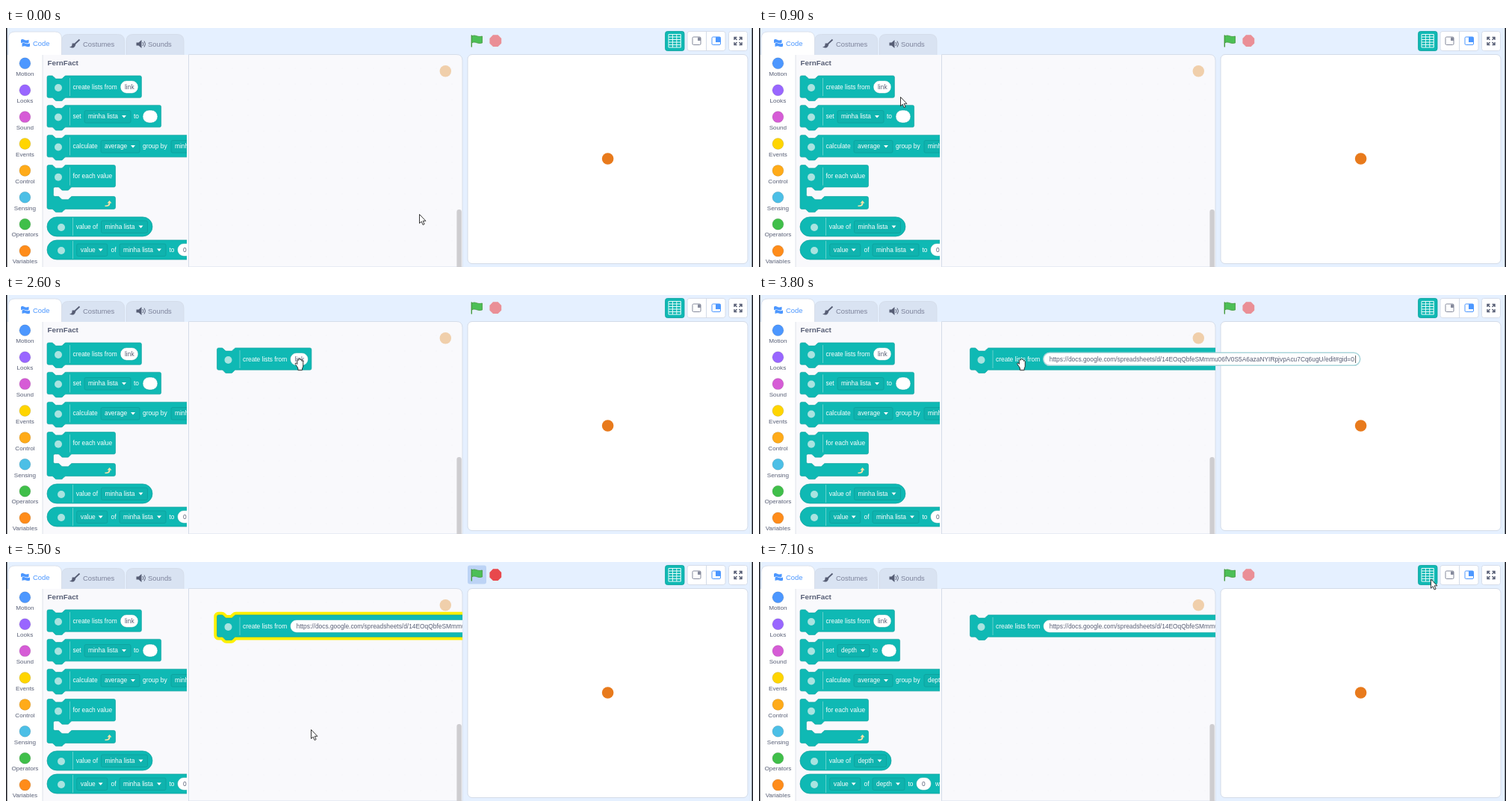
Animation, 1000 px wide and 320 px high, one loop 7.2 s. Source, as an HTML page:

```html
<!DOCTYPE html>
<html lang="en">
<head>
<meta charset="utf-8">
<title>Block editor</title>
<style>
html, body { margin: 0; width: 100%; height: 100%; overflow: hidden; background: #e5f0ff; }
svg { display: block; font-family: "Liberation Sans", Arial, sans-serif; }
</style>
</head>
<body>
<svg id="stage" width="1000" height="320" viewBox="0 0 1000 320"></svg>
<script>
const LOOP = 7200, STEP = 100;
const TEAL = '#0fb9b4', TEAL_DARK = '#0ea09c', GRAY = '#575e75', LINE = '#d3dbe8';
const URL_TEXT = 'https://docs.google.com/spreadsheets/d/14EOqQbfeSMmmu06fV0S5A6azaNYIRpjvpAcu7Cq6ugU/edit#gid=0';

const attrs = o => Object.entries(o).map(([k, v]) => `${k}="${v}"`).join(' ');
const rect = (x, y, width, height, rx, fill, more = {}) =>
  `<rect ${attrs({ x, y, width, height, rx, fill, ...more })}/>`;
const circle = (cx, cy, r, fill, more = {}) => `<circle ${attrs({ cx, cy, r, fill, ...more })}/>`;
const path = (d, fill, more = {}) => `<path ${attrs({ d, fill, ...more })}/>`;
const text = (x, y, str, fill = '#fff', size = 8.4, more = {}) =>
  `<text ${attrs({ x, y, fill, 'font-size': size, ...more })}>${str}</text>`;
const group = (id, body, more = {}) => `<g ${attrs({ id, ...more })}>${body}</g>`;

// Block outlines, in units of UNIT pixels
const UNIT = 0.525;
const NOTCH = 'c2 0 3 1 4 2l4 4c1 1 2 2 4 2h12c2 0 3-1 4-2l4-4c1-1 2-2 4-2';
const BUMP = 'c-2 0-3 1-4 2l-4 4c-1 1-2 2-4 2h-12c-2 0-3-1-4-2l-4-4c-1-1-2-2-4-2';
function outline(width, mouth) {
  const w = width / UNIT;
  const corner = 'a4 4 0 0 1-4 4';
  const inner = mouth
    ? `${corner}H64${BUMP}h-8a4 4 0 0 0-4 4v16a4 4 0 0 0 4 4h8${NOTCH}H${w - 4}a4 4 0 0 1 4 4v24` : '';
  return `M0 4a4 4 0 0 1 4-4h8${NOTCH}H${w - 4}a4 4 0 0 1 4 4v48${inner}${corner}H48${BUMP}H4a4 4 0 0 1-4-4z`;
}
const shape = (x, y, d, fill, more) =>
  path(d, fill, { transform: `translate(${x} ${y}) scale(${UNIT})`, ...more });
const badge = (x, y) => circle(x, y + 1, 5, '#a9e3e0') +
  path(`M${x + 15.5} ${y - 12}v24`, 'none', { stroke: '#6fd3cf', 'stroke-width': 0.9 });
const block = (y, width, mouth) =>
  shape(55, y - 15.1, outline(width, mouth), TEAL, { stroke: TEAL_DARK, 'stroke-width': 1.2 }) + badge(70, y);
const pill = (y, width) =>
  rect(55, y - 13, width, 26, 13, TEAL, { stroke: TEAL_DARK, 'stroke-width': 0.7 }) + badge(74, y);
const label = (x, y, str) => text(x, y + 2.6, str);
const menu = (x, y, width, str) =>
  rect(x, y - 8, width, 16.5, 2, '#0fb3ae', { stroke: TEAL_DARK, 'stroke-width': 0.8 }) +
  label(x + 5, y, str) + path(`M${x + width - 12} ${y - 1.5}h6l-3 3.4z`, '#fff');
const slot = (x, y, width, str = '', inset = 6) =>
  rect(x, y - 8.5, width, 17, 8.5, '#fff', { stroke: TEAL_DARK, 'stroke-width': 0.5 }) +
  text(x + inset, y + 2.6, str, GRAY);

const linkBlock = (width, slotWidth, str, inset) =>
  block(79, width) + label(89.5, 79, 'create lists from') + slot(153, 79, slotWidth, str, inset);

function palette(id, name, nameWidth) {
  const menuWidth = nameWidth + 22;
  return group(id,
    block(118.5, 112.6 + nameWidth) + label(89.5, 118.5, 'set') + menu(105, 118.5, menuWidth, name) +
    label(131 + nameWidth, 118.5, 'to') + slot(143 + nameWidth, 118.5, 20) +
    block(158.5, 300) + label(89.5, 158.5, 'calculate') + menu(127, 158.5, 52, 'average') +
    label(183, 158.5, 'group by') + menu(221, 158.5, menuWidth, name) +
    pill(266, 101 + nameWidth) + label(93.7, 266, 'value of') + menu(127.5, 266, menuWidth, name) +
    pill(297, 300) + menu(94.7, 297, 41, 'value') + label(140.6, 297, 'of') +
    menu(152, 297, menuWidth, name) + label(178.5 + nameWidth, 297, 'to') +
    slot(189.5 + nameWidth, 297, 20, '0', 7.5) + label(215 + nameWidth, 297, 'w'));
}

function header() {
  const tab = (x, y, w, fill) =>
    path(`M${x} 37V${y + 9}q0-9 9-9h${w - 18}q9 0 9 9V37z`, fill, { stroke: LINE, 'stroke-width': 0.8 });
  const button = (x, w) => rect(x, 4.5, w, 26, 3, '#fff', { stroke: LINE, 'stroke-width': 0.9 });
  const muted = '#7c829a';
  const wave = (x, y) =>
    path(`M${x} ${y}c2-1.5 3.5-.2 5.5.4s3.5.2 5-.5v4c-2 1.3-3.5.5-5.5 0s-3.5-.3-5 .4z`, '#4c97ff');
  let cells = '';
  for (let row = 0; row < 5; row++)
    for (let col = 0; col < 3; col++)
      cells += rect(887.5 + col * 5.4, 9 + row * 3.5, 4.4, 2.5, 0, TEAL);
  return tab(74.5, 8.5, 84, '#d9e3f2') + tab(161, 8.5, 77, '#d9e3f2') + tab(3, 5, 71.5, '#fff') +
    wave(20, 15.8) + wave(21.5, 20.6) + text(36, 23.5, 'Code', '#4c97ff', 9.4) +
    path('M98.5 15.5l-6.5 6M92.5 21.5q-1 5-5 4 2-1 2-4z', GRAY, { stroke: GRAY, 'stroke-width': 1.8 }) +
    text(103, 24.8, 'Costumes', muted, 9.4) +
    path('M174.5 19.5h3l4-3.5v11l-4-3.5h-3z', GRAY) +
    path('M183 19q2 2.5 0 5M185 17.5q3 4 0 8', 'none', { stroke: GRAY, 'stroke-width': 1 }) +
    text(190, 24.8, 'Sounds', muted, 9.4) +
    rect(618, 4.5, 25, 25, 3, '#bcd3f5', { id: 'flagLit' }) +
    path('M623.5 11c5-3 7 2 14 0v9c-7 2-9-3-14 0z', '#4cbf56', { stroke: '#45993d', 'stroke-width': 0.8 }) +
    path('M623.3 10v15', 'none', { stroke: '#45993d', 'stroke-width': 1.4, 'stroke-linecap': 'round' }) +
    path('M652 9.3h6.6l4.6 4.6v6.6l-4.6 4.6H652l-4.6-4.6v-6.6z', '#ea8f96', { id: 'stop' }) +
    rect(882.5, 4.5, 25.5, 26, 3, TEAL, { stroke: TEAL_DARK, 'stroke-width': 0.8 }) +
    rect(886.5, 8, 17.3, 18.5, 1, '#e9fbfa') + cells +
    button(912, 51) + button(967.5, 25) + path('M937.5 4.5v26', 'none', { stroke: LINE }) +
    rect(919, 12, 11, 10.5, 1.5, '#fff', { stroke: '#858a9c', 'stroke-width': 1 }) +
    rect(926, 12.5, 4, 4.5, 0.5, '#858a9c') +
    rect(945, 12, 11.5, 10.5, 1.5, '#fff', { stroke: '#4c97ff', 'stroke-width': 1 }) +
    rect(950, 12, 6.5, 7, 0.5, '#4c97ff') +
    path('M975 16v-3.5h3.5M981.5 12.5h3.5v3.5M985 19v3.5h-3.5M978.5 22.5H975V19M975.5 13l3 3M984.5 13l-3 3M984.5 22l-3-3M975.5 22l3-3',
      'none', { stroke: GRAY, 'stroke-width': 1.4 });
}

function categories() {
  const items = [['Motion', '#4c97ff'], ['Looks', '#9966ff'], ['Sound', '#d65cd6'], ['Events', '#ffd500'],
    ['Control', '#ffab19'], ['Sensing', '#4cbfe6'], ['Operators', '#40bf4a'], ['Variables', '#ff8c1a']];
  return rect(1, 36, 48, 284, 0, '#fff') + items.map(([name, fill], i) => {
    const y = 47.3 + i * 35.9;
    return circle(25.4, y, 7.5, fill, { stroke: '#0002', 'stroke-width': 0.8 }) +
      text(25.4, y + 16.7, name, GRAY, 8.1, { 'text-anchor': 'middle' });
  }).join('');
}

const flyout = () => rect(49, 36, 195, 284, 0, '#f9f9fc') +
  path('M49 36v284M244.5 36v284', 'none', { stroke: '#dcdfe8', 'stroke-width': 0.9 }) +
  text(55.5, 50.3, 'FernFact', GRAY, 9.8, { 'font-weight': 'bold' }) +
  `<g clip-path="url(#flyoutClip)">` +
  linkBlock(126.4, 24, 'link') + block(198.7, 91.5, true) + label(89.5, 198.7, 'for each value') +
  path('M132.5 237.5q5 .5 5-3h-2l3-3.5 3 3.5h-2q0 5-7 4.5z', '#f7e3a8') +
  palette('listPalette', 'minha lista', 40) + palette('depthPalette', 'depth', 21) + '</g>';

const workspace = () =>
  path('M244.5 35.5H603q8 0 8 8V320H244.5z', '#f9f9fc', { stroke: LINE, 'stroke-width': 0.9 }) +
  rect(245, 37, 357, 283, 0, 'url(#dots)') +
  circle(588.3, 57.7, 7.7, '#f0cfab') +
  rect(603.4, 243, 6.4, 110, 3.2, '#cecdd0', { id: 'scrollbar' }) +
  `<g clip-path="url(#workClip)">` +
  group('mover',
    shape(55, 63.9, outline(600), 'none', { id: 'glow', stroke: '#fff000', 'stroke-width': 16 }) +
    group('shortBlock', linkBlock(126.4, 24, 'link')) +
    group('longBlock', linkBlock(600, 424, URL_TEXT, 8.3))) + '</g>';

const stagePane = () =>
  rect(618, 35.5, 375, 280, 6, '#fff', { stroke: LINE, 'stroke-width': 1 }) +
  circle(805.6, 175, 7.8, '#e87a1c');

const editors = () => {
  const edge = { stroke: '#a9d5da', 'stroke-width': 1.6 };
  return group('linkEditor', rect(380.7, 77.3, 24, 17, 8.5, '#fff', edge) +
      rect(386, 81, 13.5, 10, 0, '#b4d5fe') + text(386.5, 88.6, 'link', GRAY)) +
    group('urlEditor', rect(380.7, 77.3, 424, 17, 8.5, '#fff', edge) + text(388.8, 88.6, URL_TEXT, GRAY) +
      path('M798.6 81v10', 'none', { stroke: '#333', 'stroke-width': 0.8 }));
};

const pointers = () => {
  const ink = { stroke: '#222', 'stroke-width': 0.9, 'stroke-linejoin': 'round' };
  return group('pointer',
    path('M0 0V12L2.7 9.6 4.6 14 6.6 13.1 4.7 8.8H8.4z', '#fff', { id: 'arrow', ...ink }) +
    path('M-3.4 10.5L-5.4 7.5q-.4-1.8 1.1-1.4L-3 7.5V2.4q.9-1.5 1.8 0V1.2q1-1.5 2 0v.6q1-1.3 1.9.2v1.4q1-1 1.8.3V10Q4.4 12 3.4 13v2.6H-2V13z',
      '#fff', { id: 'hand', transform: 'scale(1.06 1)', ...ink }));
};

const svg = document.getElementById('stage');
svg.innerHTML = `<defs>
  <pattern id="dots" x="251" y="44" width="21" height="21" patternUnits="userSpaceOnUse">${circle(10, 10, 0.6, '#eeeef4')}</pattern>
  <clipPath id="flyoutClip">${rect(49, 36, 193, 284, 0, '#000')}</clipPath>
  <clipPath id="workClip">${rect(245, 36, 366, 284, 0, '#000')}</clipPath>
  </defs>` + rect(0, 0, 1000, 320, 0, '#e5f0ff') + header() + categories() + flyout() + workspace() +
  stagePane() + rect(0, 0, 1.5, 320, 0, '#15161c') + rect(998.5, 0, 1.5, 320, 0, '#15161c') +
  editors() + pointers();

const el = Object.fromEntries([...svg.querySelectorAll('[id]')].map(node => [node.id, node]));
const show = (name, on) => el[name].setAttribute('display', on ? 'inline' : 'none');

// Pointer path: time, x, y
const PATH = [
  [0, 553.5, 249.5], [900, 189.5, 92.5], [1200, 106, 87.5], [1300, 106, 87.5],
  [1900, 333.5, 94.5], [2100, 333.5, 94.5], [2600, 393, 85], [3600, 393, 85],
  [3800, 351.5, 85], [4100, 337, 85], [4800, 337, 85], [5000, 543, 160],
  [5200, 408.5, 224.5], [5800, 408.5, 224.5], [6600, 973, 24], [6900, 899.5, 23], [LOOP, 899.5, 23]
];
const GRAB = 1300, DROP = 2100, EDIT = 3300, PASTE = 3700, RUN = 4500, DONE = 5900;

function pointerAt(t) {
  const i = PATH.findIndex(p => p[0] > t);
  const [t0, x0, y0] = PATH[i - 1], [t1, x1, y1] = PATH[i];
  const u = (t - t0) / (t1 - t0), e = u * u * (3 - 2 * u);
  return [x0 + (x1 - x0) * e, y0 + (y1 - y0) * e];
}

function render(time) {
  const t = Math.floor((time % LOOP) / STEP) * STEP;
  const [x, y] = pointerAt(t);
  const between = (a, b) => t >= a && t < b;
  const dragging = between(GRAB, DROP), running = between(RUN, DONE);

  const [dx, dy] = dragging ? [x - 106, y - 87.5] : [227.5, 7];
  el.mover.setAttribute('transform', `translate(${dx} ${dy})`);
  el.mover.style.filter = dragging ? 'drop-shadow(0 0 2.5px rgba(0,0,0,.6))' : 'none';
  show('shortBlock', between(GRAB, PASTE));
  show('longBlock', t >= PASTE);
  show('glow', running);
  show('linkEditor', between(EDIT, PASTE));
  show('urlEditor', between(PASTE, RUN));
  show('flagLit', running);
  el.stop.setAttribute('fill', running ? '#e8484c' : '#ea8f96');
  el.scrollbar.setAttribute('y', t < DROP ? 243 : 217);
  show('listPalette', t < DONE);
  show('depthPalette', t >= DONE);

  const overBlock = between(1100, GRAB) || between(2200, 4900);
  show('hand', overBlock);
  show('arrow', !overBlock);
  el.pointer.setAttribute('transform', `translate(${x} ${y})`);
}

const start = performance.now();
function tick() {
  render(performance.now() - start);
  requestAnimationFrame(tick);
}
tick();
</script>
</body>
</html>
```
